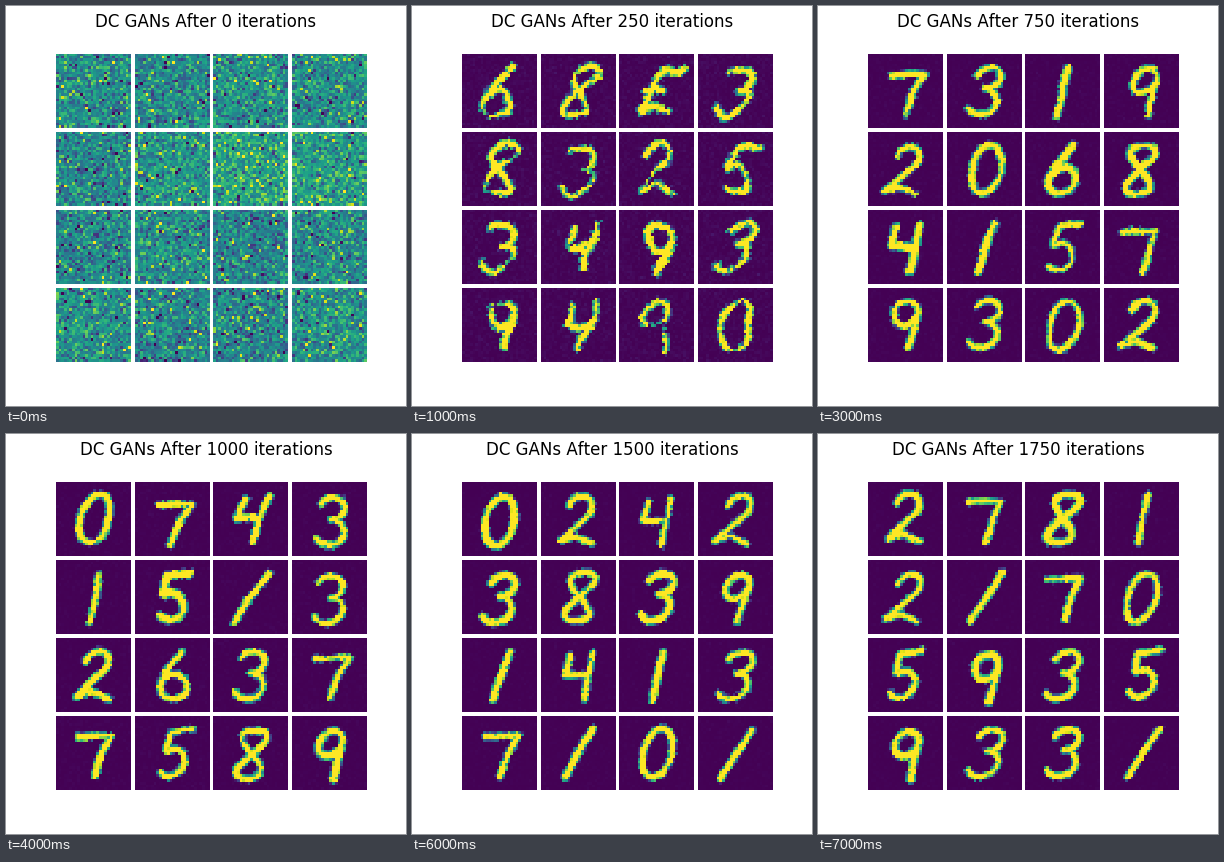
Animation, 400 px wide and 400 px high, one loop 8 s. Source, as a matplotlib script:

```python
import numpy as np
import matplotlib.pyplot as plt
from matplotlib.animation import FuncAnimation

SIZE = 28                  # samples per tile side
UNIT = 2.65                # screen pixels per sample
STEP = 250                 # iterations between two pictures
HALF_W, HALF_H = 19, 24    # half size of a digit in pixels
rng = np.random.default_rng(11)
AXIS = (np.arange(SIZE) + 0.5) * UNIT
GX, GY = np.meshgrid(AXIS, AXIS)


def line(*coords):
    return np.reshape(coords, (-1, 2)).astype(float)


def arc(cx, cy, rx, ry, start, stop):
    t = np.radians(np.linspace(start, stop, 40))
    return np.column_stack([cx + rx * np.cos(t), cy + ry * np.sin(t)])


def path(*pieces):
    """Join pieces and space points evenly along them."""
    p = np.vstack(pieces)
    length = np.r_[0, np.cumsum(np.hypot(*np.diff(p, axis=0).T))]
    even = np.linspace(0, length[-1], 130)
    return np.column_stack([np.interp(even, length, c) for c in p.T])


def figure_eight():
    t = np.linspace(0, 2 * np.pi, 80)
    return np.column_stack([0.65 * np.sin(2 * t), -np.cos(t)])


# Strokes in a box from -1 to 1, y pointing down
SHAPES = {
    "0": [path(arc(0, 0, 0.75, 1, 0, 360))],
    "1": [path(line(0, -1, 0, 1))],
    "/": [path(line(0.55, -1, -0.55, 1))],
    "2": [path(arc(0, -0.5, 0.6, 0.5, 190, 390),
               line(-0.75, 0.85, 0, 0.65, 0.9, 0.95))],
    "3": [path(arc(0, -0.52, 0.65, 0.44, 200, 430),
               arc(0, 0.45, 0.75, 0.53, 270, 510))],
    "4": [path(line(-0.6, -0.8, -0.75, 0, 0.4, 0)),
          path(line(0.55, -0.9, 0.4, 1))],
    "5": [path(line(0.7, -1, -0.4, -0.85, -0.45, -0.1),
               arc(0, 0.4, 0.65, 0.55, 240, 500))],
    "6": [path(line(0.2, -1, -0.45, -0.2), arc(0, 0.45, 0.7, 0.52, 200, 560))],
    "7": [path(line(-1, -0.65, 0.7, -0.7, 0.4, 0, 0.2, 1))],
    "8": [path(figure_eight())],
    "9": [path(arc(-0.1, -0.45, 0.6, 0.5, 0, -360), line(0.5, -0.45, 0.45, 1))],
    "E": [path(line(1, -0.9, 0, -0.9, -0.3, 0, -0.8, 0.75, 0, 0.65, 0.8, 0.7)),
          path(line(-0.5, 0, 0.3, -0.1))],
    "#": [path(line(-0.9, -0.9, 0.9, -0.9, 0.9, 0.9, -0.9, 0.9, -0.9, -0.9)),
          path(line(-0.7, 0, 0.7, 0.2, -0.7, 0.4, 0.7, 0.6))],
}

# Tiles of each picture, left to right and top to bottom
SHEETS = ["68E3832534939490", "75171404" "8#086284", "7319206841579302",
          "074315/326377589", "5208713946013725", "0242383914137/0/",
          "27812/705935933/"]


def noise_tile():
    offset = rng.normal(0.49, 0.035)
    return np.clip(offset + 0.13 * rng.standard_t(5, GX.shape), 0, 1)


def patches():
    """Slow waves between 0 and 1 that thin out the ink."""
    a, b = rng.uniform(0, 2 * np.pi, 2)
    return 0.5 + 0.5 * np.sin(GX / 9 + a) * np.sin(GY / 9 + b)


def digit_tile(char, rough):
    """One handwritten digit; rough falls from 1 as training goes on."""
    half = 7 if char == "#" else rng.normal(3.6, 0.3)
    slant = 0 if char == "#" else rng.normal(0.27, 0.08)
    cx, cy = rng.normal(38, 1, 2)
    phase = rng.uniform(0, 2 * np.pi)
    dist = np.full(GX.shape, np.inf)
    for stroke in SHAPES[char]:
        u, v = stroke.T
        x = cx + HALF_W * (u - slant * v + 0.15 * rough * np.sin(3 * v + phase))
        y = cy + HALF_H * v + 2 * rough * np.sin(4 * u + phase)
        gap = np.hypot(GX[..., None] - x, GY[..., None] - y).min(axis=-1)
        dist = np.minimum(dist, gap)
    dist += rng.normal(0, 0.4 + 0.4 * rough, dist.shape)
    dist += (0.5 + 2.5 * rough) * patches() ** 3
    ink = np.clip((half - dist) / UNIT + 0.5, 0, 1)
    haze = np.abs(rng.normal(0, 0.004 + 0.012 * rough, GX.shape))
    return np.maximum(ink, haze)


sheets = [[noise_tile() for _ in range(16)]]
for n, chars in enumerate(SHEETS, start=1):
    sheets.append([digit_tile(c, 1 / n) for c in chars])

plt.rcParams["text.kerning_factor"] = 6
fig, axes = plt.subplots(4, 4, figsize=(4, 4), dpi=100,
                         gridspec_kw=dict(wspace=0.05, hspace=0.05))
title = fig.suptitle("", y=0.983)
tiles = []
for ax in axes.flat:
    ax.axis("off")
    tiles.append(ax.imshow(np.zeros((SIZE, SIZE)), cmap="viridis", vmin=0, vmax=1,
                           interpolation="nearest"))


def update(i):
    title.set_text(f"DC GANs After {i * STEP} iterations")
    for tile, data in zip(tiles, sheets[i]):
        tile.set_data(data)
    return [title, *tiles]


anim = FuncAnimation(fig, update, frames=len(sheets), interval=1000,
                     repeat=True, repeat_delay=0, blit=False)
plt.show()
```
